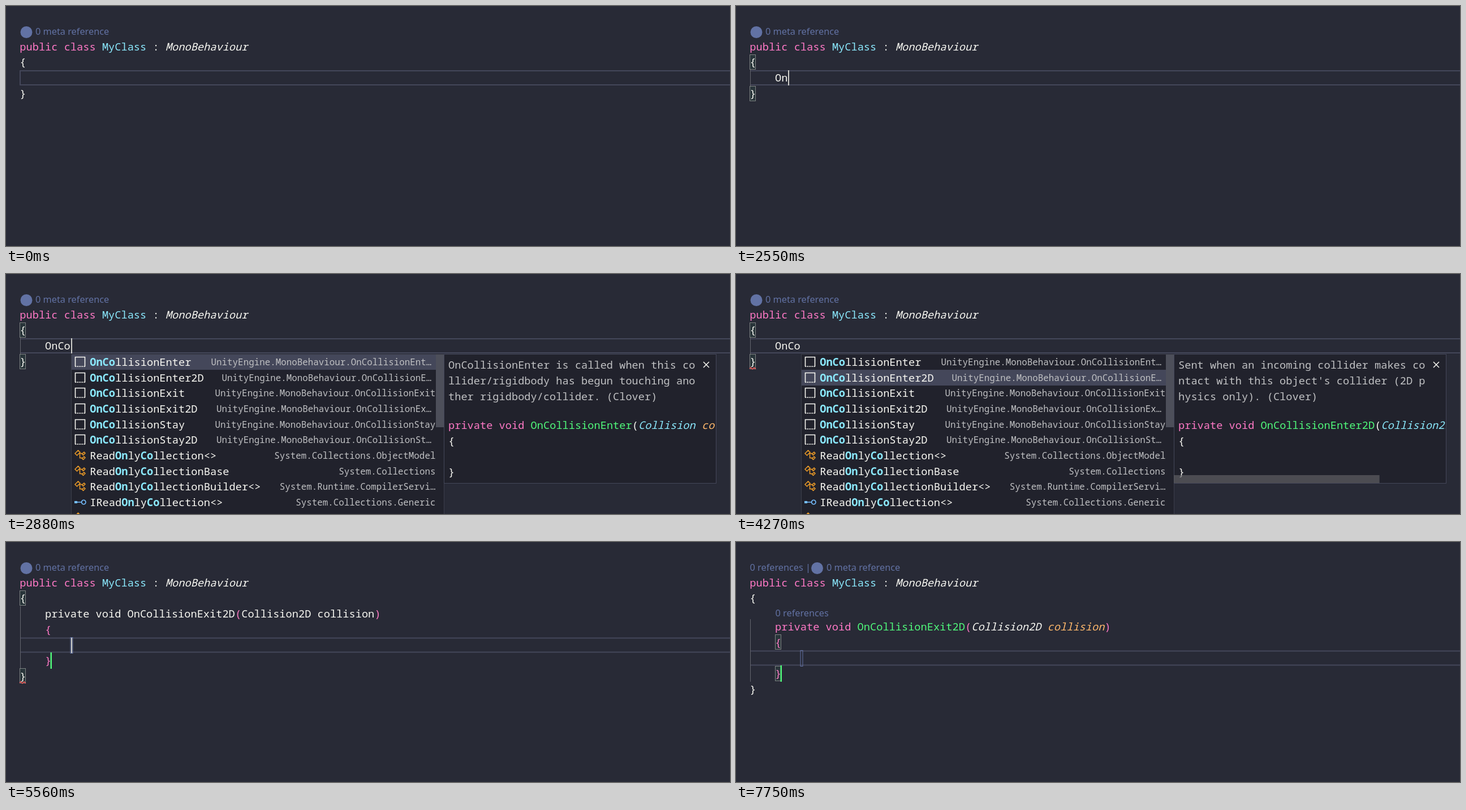
An HTML page with a canvas that plays this animation: 1280 px wide and 426 px high, repeating every 7800 ms.

```html
<!DOCTYPE html>
<html lang="en">
<head>
<meta charset="utf-8">
<title>Code completion</title>
<style>
html, body { margin: 0; width: 100%; height: 100%; overflow: hidden; background: #282a36; }
canvas { display: block; }
</style>
</head>
<body>
<canvas id="stage" width="1280" height="426"></canvas>
<script>
const ctx = document.getElementById('stage').getContext('2d');
const LOOP = 7800, LINE = 27.67, COL = 11.2, LEFT = 24.3;
const MONO = '"Noto Sans Mono", monospace';
const BACK = '#282a36', WHITE = '#f8f8f2', BLUE = '#6272a4', GREY = '#44475a', PANEL = '#21222c';
const GUIDE = '#63656d', CARET = '#cfcfca';
const COLORS = { w: WHITE, p: '#ff79c6', c: '#8be9fd', g: '#50fa7b', o: '#ffb86c', d: '#c0c1c3' };

const NS = 'UnityEngine.MonoBehaviour.';
const SERIAL = 'System.Runtime.Serialization';
// kind (c class, s snippet, i interface), label, detail
const LIST_ON = [
  ['c', 'OnDeserializedAttribute', SERIAL],
  ['c', 'OnDeserializingAttribute', SERIAL],
  ['c', 'OneWayAttribute', 'System.Runtime.Remoting.Messaging'],
  ['c', 'OnSerializedAttribute', SERIAL],
  ['c', 'OnSerializingAttribute', SERIAL],
  ['s', 'OnApplicationPause', NS + 'OnApplicatio…'],
  ['s', 'OnApplicationQuit', NS + 'OnApplication…'],
  ['s', 'OnBecameInvisible', NS + 'OnBecameInvis…'],
  ['s', 'OnBecameVisible', NS + 'OnBecameVisible'],
  ['s', 'OnCollisionEnter', NS + 'OnCollisionEnt…'],
  ['s', 'OnCollisionEnter2D', NS + 'OnCollisionE…']
];
const LIST_ONCO = [
  ['s', 'OnCollisionEnter', NS + 'OnCollisionEnt…'],
  ['s', 'OnCollisionEnter2D', NS + 'OnCollisionE…'],
  ['s', 'OnCollisionExit', NS + 'OnCollisionExit'],
  ['s', 'OnCollisionExit2D', NS + 'OnCollisionEx…'],
  ['s', 'OnCollisionStay', NS + 'OnCollisionStay'],
  ['s', 'OnCollisionStay2D', NS + 'OnCollisionSt…'],
  ['c', 'ReadOnlyCollection<>', 'System.Collections.ObjectModel'],
  ['c', 'ReadOnlyCollectionBase', 'System.Collections'],
  ['c', 'ReadOnlyCollectionBuilder<>', 'System.Runtime.CompilerServi…'],
  ['i', 'IReadOnlyCollection<>', 'System.Collections.Generic'],
  ['c', 'ReadOnlyCollectionView<>', 'System.Collections']
];
const DOCS = [
  ['OnCollisionEnter is called when this co', 'llider/rigidbody has begun touching ano', 'ther rigidbody/collider. (Clover)'],
  ['Sent when an incoming collider makes co', "ntact with this object's collider (2D p", 'hysics only). (Clover)'],
  ['OnCollisionExit is called when this col', 'lider/rigidbody has stopped touching an', 'other rigidbody/collider. (Clover)'],
  ['Sent when a collider on another object', "stops touching this object's collider (", '2D physics only). (Clover)']
];

const passed = (t, ...times) => times.filter(at => t >= at).length;
const within = (t, ...spans) => spans.some(([from, to]) => t >= from && t < to);

// Marked-up text: ~x picks a colour, uppercase is italic, ~B is bold cyan. y is the row centre.
function write(markup, x, y, size = 18.66, advance = COL) {
  const baseline = Math.round(y + size * 0.35);
  let key = 'w';
  markup.split(/~(.)/).forEach((part, i) => {
    if (i % 2) { key = part; return; }
    const bold = key === 'B', italic = !bold && key < 'a';
    ctx.font = `${italic ? 'italic ' : ''}${bold ? 'bold ' : ''}${size}px ${MONO}`;
    ctx.fillStyle = COLORS[bold ? 'c' : key.toLowerCase()];
    ctx.fillText(part, x, baseline);
    x += part.length * advance;
  });
}

function box(x, y, w, h, color) {
  ctx.fillStyle = color;
  ctx.fillRect(x, y, w, h);
}

function outline(x, y, w, h, color, width = 1) {
  ctx.strokeStyle = color;
  ctx.lineWidth = width;
  ctx.strokeRect(x, y, w, h);
}

function path(d, color, width = 1.6) {
  ctx.strokeStyle = color;
  ctx.lineWidth = width;
  ctx.stroke(new Path2D(d));
}

function lens(text, x, y) {
  ctx.font = '16.3px "Noto Sans", sans-serif';
  ctx.fillStyle = BLUE;
  ctx.fillText(text, x, y + 6);
}

function badge(x) {
  ctx.fillStyle = BLUE;
  ctx.beginPath();
  ctx.arc(x, 46.5, 10.5, 0, 7);
  ctx.fill();
}

function bracketBox(x, y) {
  const top = Math.round(y - 14);
  box(x, top, 11, 27, '#29353a');
  outline(x + 0.5, top + 0.5, 10, 26, '#7e8382');
}

function lineBox(y) { outline(25, y - 12.5, 1300, 25, GREY, 2); }

function guide(y, height) {
  box(24, y, 2, height, BACK);
  box(25, y, 1, height, GUIDE);
}

function squiggle(y) { path(`M24 ${y} l2 -2 l3 3 l3 -3 l3 3`, '#ff5555', 1.3); }

function icon(kind, x, y, selected) {
  ctx.save();
  ctx.translate(x, Math.round(y - 10.5));
  if (kind === 's') {
    path('M1.5 18 V1.5 H18.5 V18', WHITE);
    for (let i = 0; i < 6; i++) box(1 + i * 3.2, 17.2, 1.8, 1.8, WHITE);
  } else if (kind === 'c') {
    path('M1 6.5 L6.5 1 L10 4.5 L4.5 10 Z M8 6.5 H14 M9.5 6.5 V14.5 H14 M13.5 7.5 L17 4 L19 6 L15.5 9.5 Z M13.5 15.5 L17 12 L19 14 L15.5 17.5 Z',
      selected ? WHITE : '#ee9d28', 1.5);
  } else {
    path('M5 10 H12 M20 10 a3.7 3.7 0 1 0 -7.4 0 a3.7 3.7 0 1 0 7.4 0', '#75beff');
    box(0, 8, 5, 4, '#75beff');
  }
  ctx.restore();
}

function popup(x, rows, query, selected, thumb) {
  box(x, 142, 660, 300, PANEL);
  box(x, Math.round(142 + selected * LINE), 645, 28, GREY);
  box(x + 645, 142, 14, thumb, '#4d4f5a');
  outline(x + 0.5, 142.5, 659, 300, '#3c3e4b');
  rows.forEach(([kind, label, detail], i) => {
    const y = 156.5 + i * LINE;
    let marked = label;
    for (const hit of query.match(/..?/g)) marked = marked.replace(hit, `~B${hit}~w`);
    icon(kind, x + 6, y, i === selected);
    write(marked, x + 33.2, y);
    const gap = /^U.*…$/.test(detail) ? 7 : 0;
    write('~d' + detail, x + 644.5 - gap - detail.length * 9.51, y, 15.85, 9.51);
  });
}

function panel(x, height, draw) {
  box(x, 142, 482, height, PANEL);
  outline(x + 0.5, 142.5, 481, height - 1, GREY);
  ctx.save();
  ctx.beginPath();
  ctx.rect(x, 142, 480, height);
  ctx.clip();
  draw(x + 8);
  ctx.restore();
  path(`M${x + 459} 156 l10 10 m0 -10 l-10 10`, WHITE, 1.5);
}

function docs(index, scrollbar) {
  const name = LIST_ONCO[index][1], type = index % 2 ? 'Collision2D' : 'Collision';
  panel(774, 230, x => {
    DOCS[index].forEach((line, i) => write('~d' + line, x, 161.6 + i * 28));
    write(`~pprivate void ~g${name}~w(~C${type} ~Ocollision~w)`, x, 268.8);
    write('{', x, 296.4);
    write('}', x, 351.8);
    if (scrollbar) {
      const textWidth = `private void ${name}(${type} collision)`.length * COL;
      box(774, 357, 482 * 482 / (textWidth + 34), 14, 'rgba(96,97,101,.68)');
    }
  });
}

function header(references) {
  if (references) {
    lens('0 references |', 24.5, 45);
    badge(143.5);
    lens('0 meta reference', 160, 45);
  } else {
    badge(36);
    lens('0 meta reference', 52, 45);
  }
  write('~ppublic class ~cMyClass ~w: ~WMonoBehaviour', LEFT, 72.3);
}

function typing(t) {
  const focused = t >= 1170;
  const count = passed(t, 2420, 2500, 2730, 2790);
  const query = 'OnCo'.slice(0, count);
  lineBox(127.5);
  if (focused) {
    guide(113, 29);
    bracketBox(24, 100);
    bracketBox(24, 155.6);
  }
  write('{', LEFT, 99.9);
  write('}', LEFT, 155.6);
  if (t >= 3600) squiggle(168);
  write(query, 69, 127.8);

  if (t >= 2730) {
    popup(count === 3 ? 103 : 115, LIST_ONCO, query, passed(t, 4030, 4370, 4750), 130);
    if (t >= 2850) docs(passed(t, 4060, 4400, 4790), t >= 4270);
  } else if (t >= 2570) {
    popup(91, LIST_ON, query, 0, 29);
    if (t >= 2630) panel(751, 57, x => write('~pclass ~cSystem~w.~cRuntime~w.~cSerialization~w.~cOnDe', x, 161.6));
  }

  const hidden = within(t, [1670, 2150], [3350, 3820], [4270, 4750], [5250, 5470]);
  if (focused && !hidden) box(Math.round(70 + count * COL), 114, 2, 27, CARET);
}

function inserted(t) {
  const shift = t >= 5820 ? 23 : 0;
  const row = i => 127.8 + i * LINE + shift;
  const inner = t >= 5620;
  const bracketX = inner ? 69 : 24;
  lineBox(183 + shift);
  guide(114 + shift, 111);
  bracketBox(bracketX, inner ? row(1) : 100);
  bracketBox(bracketX, row(inner ? 3 : 4));
  write('{', LEFT, 99.9);
  if (t >= 6040) lens('0 references', 69.5, 126);
  write(t < 5590
    ? 'private void OnCollisionExit2D~p(~wCollision2D collision~p)'
    : `~pprivate void ~gOnCollisionExit2D~p(~${t < 6200 ? 'C' : 'W'}Collision2D ~Ocollision~p)`, 69, row(0));
  write('~p{', 69, row(1));
  write('~p}', 69, row(3));
  write('}', LEFT, row(4));
  if (t < 6290) squiggle(250 + shift);

  outline(114, 169.5 + shift, 4, 28, BLUE);
  box(78.5, 196 + shift, 2.5, 29, COLORS.g);
  if (!within(t, [6050, 6550], [7040, 7550], [7750, LOOP])) box(115, 170 + shift, 2, 27, CARET);
}

function frame(now) {
  const t = now % LOOP;
  box(0, 0, 1280, 426, BACK);
  header(t >= 6040);
  (t < 5470 ? typing : inserted)(t);
  requestAnimationFrame(frame);
}
requestAnimationFrame(frame);
</script>
</body>
</html>
```
